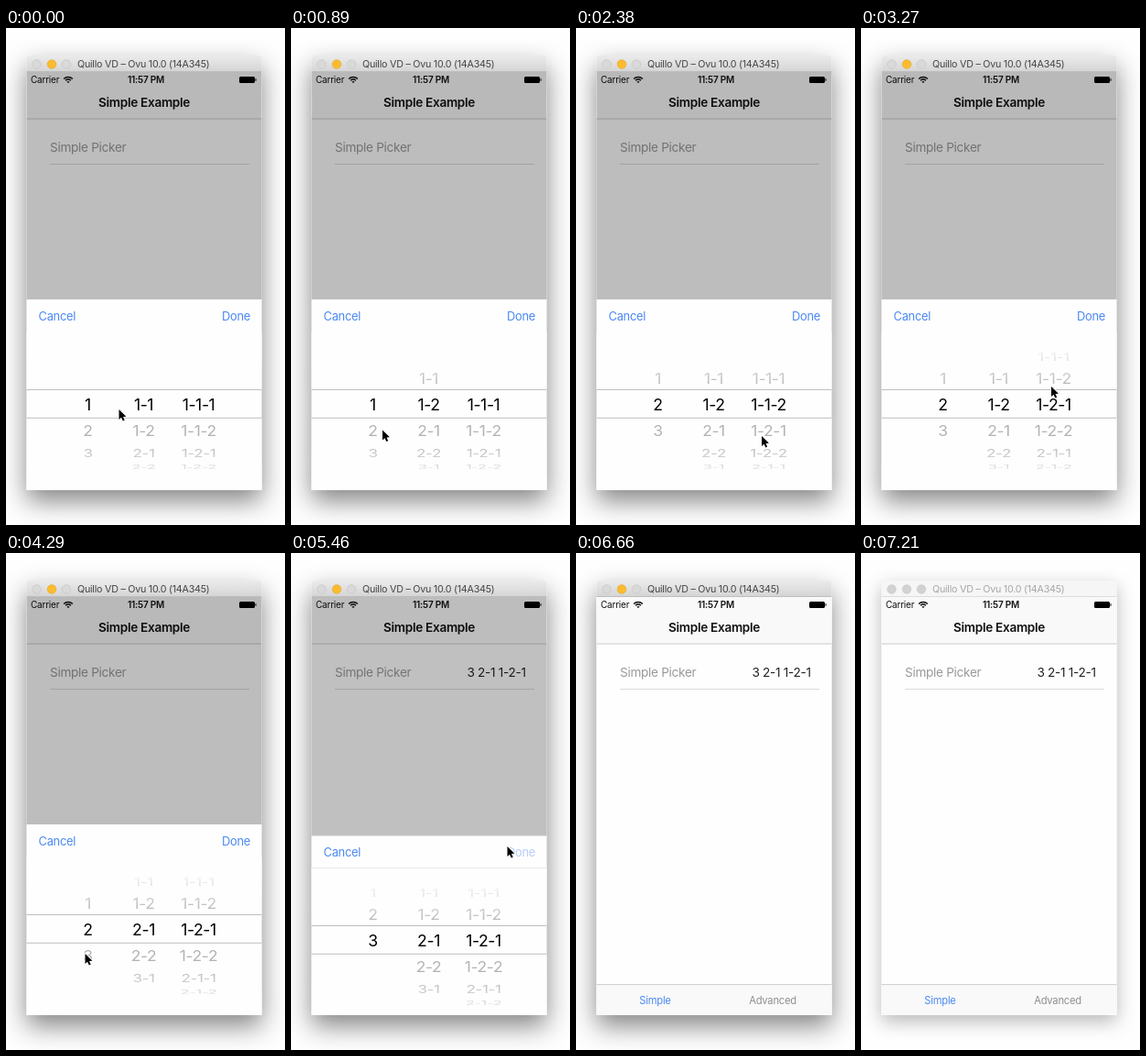
Write an HTML page with a canvas that moves like this. It is 305 px wide and 542 px high and loops after 7.31 s.

```html
<!DOCTYPE html>
<html lang="en">
<head>
<meta charset="utf-8">
<title>Simple picker</title>
<style>
html, body { margin: 0; width: 100%; height: 100%; overflow: hidden; background: #fefefe; }
canvas { display: block; width: 305px; height: 542px; }
</style>
</head>
<body>
<canvas id="stage"></canvas>
<script>
const W = 305, H = 542, LOOP = 7310;
const canvas = document.getElementById('stage');
const ctx = canvas.getContext('2d');
const dpr = window.devicePixelRatio || 1;
canvas.width = W * dpr;
canvas.height = H * dpr;

const BLUE = '#4a88f4';
const WIN = { x: 22.5, y: 30, w: 257, h: 474 };

// Bursts of picture changes: first time, last time, number of steps.
const BURSTS = [
  [150, 1190, 8], [1340, 2380, 8], [2530, 3560, 8], [3710, 4720, 8],
  [4870, 5910, 8], [6360, 6660, 3], [7210, 7210, 1]
];
const ticks = BURSTS.flatMap(([a, b, n]) =>
  Array.from({ length: n }, (_, i) => Math.round((a + (b - a) * i / Math.max(1, n - 1)) / 10) * 10));

// Key lists hold [step, value, ...] rows.
const CURSOR = [
  [0, 123.5, 416], [2, 136, 436], [3, 141, 440], [4, 141, 440], [6, 100, 438.5],
  [7, 90, 437], [10, 88.5, 437], [13, 200, 445], [14, 203, 445], [18, 203, 445],
  [20, 251, 346], [21, 248, 352], [23, 168, 430], [24, 149, 440], [26, 148, 440],
  [28, 95, 437], [29, 86.5, 437], [30, 86.5, 437], [31, 130, 415], [32, 217, 355],
  [33, 234, 326], [34, 236.5, 320], [40, 236.5, 320], [41, 231, 400], [42, 222, 531]
];
const COLUMNS = [
  { x: 89.5, items: ['1', '2', '3'],
    keys: [[8, 0], [9, 0.6], [10, 1], [29, 1], [30, 1.6], [31, 2]] },
  { x: 150.5, items: ['1-1', '1-2', '2-1', '2-2', '3-1'],
    keys: [[3, 0], [4, 0.7], [5, 1], [24, 1], [25, 1.6], [26, 2]] },
  { x: 210.5, items: ['1-1-1', '1-1-2', '1-2-1', '1-2-2', '2-1-1', '2-1-2'],
    keys: [[13, 0], [14, 0.6], [15, 1], [16, 1], [17, 1.6], [18, 2]] }
];
const SLIDE = [[36, 0], [37, 12], [38, 178], [39, 208]];

function at(keys, step) {
  let a = keys[0];
  for (const b of keys) {
    if (b[0] >= step) {
      const f = b[0] === a[0] ? 0 : Math.max(0, (step - a[0]) / (b[0] - a[0]));
      return a.slice(1).map((v, i) => v + (b[i + 1] - v) * f);
    }
    a = b;
  }
  return a.slice(1);
}

// y is the middle of the capital letters.
function text(str, x, y, size, color, align = 'left', weight = 400) {
  ctx.font = `${weight} ${size}px Inter, Roboto, sans-serif`;
  ctx.letterSpacing = `${-0.022 * size}px`;
  ctx.textAlign = align;
  ctx.fillStyle = color;
  ctx.fillText(str, x, y + 0.364 * size);
}

function rect(x, y, w, h, color) {
  ctx.fillStyle = color;
  ctx.fillRect(x, y, w, h);
}

function dot(x, y, r, fill, stroke) {
  ctx.beginPath();
  ctx.arc(x, y, r, 0, Math.PI * 2);
  ctx.fillStyle = fill;
  ctx.fill();
  ctx.strokeStyle = stroke;
  ctx.lineWidth = 0.6;
  ctx.stroke();
}

function fade(y0, y1, stops) {
  const g = ctx.createLinearGradient(0, y0, 0, y1);
  stops.forEach(([p, c]) => g.addColorStop(p, c));
  return g;
}

function windowPath() {
  ctx.beginPath();
  ctx.roundRect(WIN.x, WIN.y, WIN.w, WIN.h, [4, 4, 0, 0]);
}

function drawShadow(active) {
  ctx.save();
  ctx.shadowColor = active ? 'rgba(0,0,0,.48)' : 'rgba(0,0,0,.28)';
  ctx.shadowBlur = (active ? 28 : 20) * dpr;
  ctx.shadowOffsetY = (active ? 12 : 7) * dpr;
  ctx.fillStyle = '#fefefe';
  windowPath();
  ctx.fill();
  ctx.restore();
}

function drawTitleBar(active) {
  rect(22, 30, 258, 18, active ? fade(30, 48, [[0, '#ebebeb'], [1, '#d4d4d4']]) : '#f6f6f6');
  rect(22, 47.2, 258, 0.8, active ? '#b8b8b8' : '#d8d8d8');
  [33.5, 50, 66].forEach((x, i) => {
    if (!active) dot(x, 39.5, 4.8, '#d2d2d2', '#c6c6c6');
    else if (i === 1) dot(x, 39.5, 4.8, '#fdbc2e', '#e0a32a');
    else dot(x, 39.5, 4.8, '#d9d9d9', '#c2c2c2');
  });
  text('Quillo VD – Ovu 10.0 (14A345)', 78, 39.5, 10.7, active ? '#444' : '#a6a6a6');
}

function drawStatusBar() {
  text('Carrier', 27, 56.5, 10, '#111');
  ctx.strokeStyle = '#111';
  ctx.lineWidth = 1.5;
  for (const r of [1.5, 4.2, 6.9]) {
    ctx.beginPath();
    ctx.arc(68, 60.3, r, -Math.PI * 0.75, -Math.PI * 0.25);
    ctx.stroke();
  }
  text('11:57 PM', 153, 56.5, 10, '#111', 'center', 600);
  ctx.fillStyle = '#000';
  ctx.beginPath();
  ctx.roundRect(255, 53, 17, 7, 1.5);
  ctx.fill();
  rect(272.5, 55.2, 1, 2.6, '#000');
}

function drawPage(step) {
  rect(22, 48, 258, 456, '#fefefe');
  rect(22, 48, 258, 51, '#f9f9f9');
  rect(22, 98.6, 258, 0.9, '#c6c6ca');
  drawStatusBar();
  text('Simple Example', 151, 81.5, 13.6, '#111', 'center', 600);
  text('Simple Picker', 48, 130, 13.6, '#999');
  rect(48, 148, 218, 0.9, '#d6d6d6');
  if (step >= 37) text('3 2-1 1-2-1', 192.5, 130, 13.6, '#222');
  rect(22, 470.5, 258, 33.5, '#f9f9f9');
  rect(22, 470.2, 258, 0.9, '#c8c8c8');
  text('Simple', 86.5, 487.5, 11.2, BLUE, 'center');
  text('Advanced', 215, 487.5, 11.2, '#8e8e8e', 'center');
}

function drawColumn({ x, items, keys }, step) {
  const [pos] = at(keys, step);
  items.forEach((item, i) => {
    const angle = (i - pos) * 22.9 * Math.PI / 180;
    if (Math.abs(angle) > 1.5) return;
    const depth = 1000 / (1000 - 90 * Math.cos(angle));
    ctx.save();
    ctx.translate(x, 411 + 73.3 * Math.sin(angle));
    ctx.scale(depth, depth * Math.cos(angle));
    text(item, 0, 0, 16, '#000', 'center');
    ctx.restore();
  });
}

function drawSheet(step, slide) {
  ctx.save();
  ctx.translate(0, slide);
  rect(22, 296, 258, 208, '#fefefe');
  if (slide) {
    rect(22, 295.6, 258, 0.9, '#c4c4c4');
    rect(22, 331, 258, 0.8, '#e6e6e6');
  }
  COLUMNS.forEach(c => drawColumn(c, step));
  const solid = 'rgba(254,254,254,1)', thin = 'rgba(254,254,254,.7)';
  rect(22, 332, 258, 62.3, fade(332, 394, [[0.2, solid], [1, thin]]));
  rect(22, 425, 258, 79, fade(425, 504, [[0.3, thin], [1, solid]]));
  rect(22, 394, 258, 0.9, '#b8b8b8');
  rect(22, 424.8, 258, 0.9, '#b8b8b8');
  text('Cancel', 35.5, 314.5, 12.9, BLUE);
  ctx.globalAlpha = step >= 36 ? 0.4 : 1;
  text('Done', 267, 314.5, 12.9, BLUE, 'right');
  ctx.restore();
}

function drawCursor(x, y) {
  ctx.save();
  ctx.translate(x, y);
  ctx.beginPath();
  [[0, 0], [0, 11], [2.5, 8.7], [4.3, 12.6], [6.2, 11.8], [4.5, 8], [7.9, 7.8]]
    .forEach(p => ctx.lineTo(...p));
  ctx.closePath();
  ctx.lineJoin = 'round';
  ctx.strokeStyle = '#fff';
  ctx.lineWidth = 1.6;
  ctx.stroke();
  ctx.fillStyle = '#000';
  ctx.fill();
  ctx.restore();
}

function draw(time) {
  const step = ticks.filter(t => t <= time).length;
  const active = step < 44;
  const [slide] = at(SLIDE, step);

  ctx.setTransform(dpr, 0, 0, dpr, 0, 0);
  rect(0, 0, W, H, '#fefefe');
  drawShadow(active);

  ctx.save();
  windowPath();
  ctx.clip();
  drawPage(step);
  rect(22, 48, 258, 456, `rgba(0,0,0,${0.26 * (1 - slide / 208)})`);
  if (slide < 208) drawSheet(step, slide);
  drawTitleBar(active);
  ctx.restore();

  if (step < 43) drawCursor(...at(CURSOR, step));
}

function loop() {
  draw(performance.now() % LOOP);
  requestAnimationFrame(loop);
}
loop();
</script>
</body>
</html>
```
